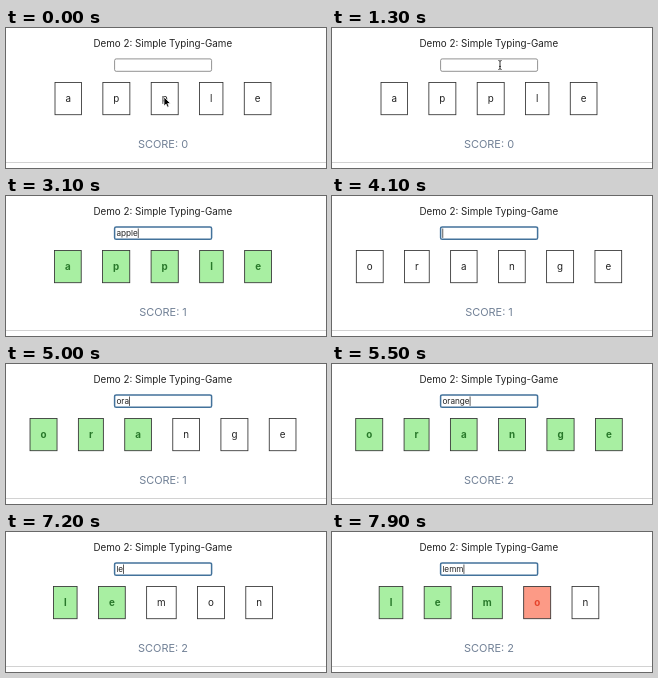
An HTML page for the animation above (8000 ms loop, 320 px wide and 140 px high).

```html
<!DOCTYPE html>
<html lang="en">
<head>
<meta charset="utf-8">
<title>Typing game</title>
<style>
  html, body { margin: 0; width: 100%; height: 100%; overflow: hidden; background: #fff; }
  svg { display: block; width: 320px; height: 140px; font-family: Inter, sans-serif; }
  .mid { text-anchor: middle; }
  .title { font-size: 9.8px; fill: #222; }
  .score { font-size: 10.95px; fill: #718096; }
  .typed { font-size: 8.2px; fill: #222; }
  .card rect { fill: #fff; stroke: #333; stroke-width: .85; }
  .card text { font-size: 9.8px; fill: #222; }
  .card.good rect { fill: #a8efa2; }
  .card.good text { fill: #28782a; font-weight: 700; }
  .card.bad rect { fill: #fc9a86; }
  .card.bad text { fill: #e5432b; font-weight: 700; }
  #field { fill: #fff; stroke: #767676; stroke-width: .8; }
  #field.focus { stroke: #43729b; stroke-width: 1.5; }
</style>
</head>
<body>
<svg viewBox="0 0 320 140">
  <rect width="320" height="140" fill="#fff"/>
  <rect y="134" width="320" height="1" fill="#d2d2d2"/>
  <text class="title mid" x="156.8" y="18.6">Demo 2: Simple Typing-Game</text>
  <rect id="field" x="108.6" y="30.9" width="97" height="12.4" rx="1.6"/>
  <text id="typed" class="typed" x="110.4" y="40"></text>
  <rect id="caret" y="32.5" width=".8" height="9.4" fill="#333"/>
  <g id="cards"></g>
  <text id="score" class="score mid" x="157" y="119.6"></text>
  <path id="arrow" d="M0 0V9L2.1 7.1L3.5 10.2L5 9.5L3.7 6.5H6.5Z" fill="#000" stroke="#fff" stroke-width=".7"/>
  <path id="beam" d="M-1.6 -4.5Q0 -4.5 0 -3.4Q0 -4.5 1.6 -4.5M0 -3.4V3.4M-1.6 4.5Q0 4.5 0 3.4Q0 4.5 1.6 4.5M-1 1.4H1" fill="none" stroke="#222" stroke-width=".9"/>
</svg>
<script>
const LOOP = 8000, FOCUS = 1600, BLINK = 500;
const PAD = 22, GAP = 20.35, CENTER = 157;

const rounds = [
  { start: 0, word: 'apple', keys: [[2400, 'a'], [2700, 'p'], [2800, 'p'], [2900, 'l'], [3000, 'e']] },
  { start: 4000, word: 'orange', keys: [[4800, 'o'], [4900, 'r'], [5000, 'a'], [5100, 'n'], [5200, 'g'], [5300, 'e']] },
  { start: 6300, word: 'lemon', keys: [[7100, 'l'], [7200, 'e'], [7400, 'm'], [7900, 'm']] }
];

// Pointer stops: time, x, y
const pointer = [
  [0, 158, 69], [300, 160, 64], [800, 166, 41], [1000, 167, 38],
  [1300, 168, 37], [1600, 167, 37], [2000, 281, 38], [2400, 281, 38]
];

const $ = id => document.getElementById(id);
const field = $('field'), typedText = $('typed'), caret = $('caret');
const cards = $('cards'), score = $('score'), arrow = $('arrow'), beam = $('beam');
const pen = document.createElement('canvas').getContext('2d');

function textWidth(text, size, weight = 400) {
  pen.font = `${weight} ${size * 10}px Inter, sans-serif`;
  return pen.measureText(text).width / 10;
}

function make(tag, parent, attrs) {
  const el = document.createElementNS('http://www.w3.org/2000/svg', tag);
  for (const key in attrs) el.setAttribute(key, attrs[key]);
  return parent.appendChild(el);
}

function drawCards(word, typed) {
  const list = [...word].map((letter, i) => {
    const state = i >= typed.length ? '' : typed[i] === letter ? 'good' : 'bad';
    return { letter, state, width: PAD + textWidth(letter, 9.8, state ? 700 : 400) };
  });
  const total = list.reduce((sum, c) => sum + c.width, GAP * (list.length - 1));
  let x = CENTER - total / 2;
  cards.replaceChildren();
  for (const { letter, state, width } of list) {
    const g = make('g', cards, { class: 'card ' + state });
    make('rect', g, { x: x + .5, y: 54.5, width: width - 1, height: 32.2 });
    make('text', g, { class: 'mid', x: x + width / 2, y: 74.4 }).textContent = letter;
    x += width + GAP;
  }
}

function pointerAt(t) {
  const i = Math.max(1, pointer.findIndex(p => p[0] >= t));
  const [t0, x0, y0] = pointer[i - 1], [t1, x1, y1] = pointer[i];
  const k = (t - t0) / (t1 - t0), s = k * k * (3 - 2 * k);
  return [x0 + (x1 - x0) * s, y0 + (y1 - y0) * s];
}

function drawPointer(t) {
  const shown = t < 2400;
  const [x, y] = shown ? pointerAt(t) : [0, 0];
  const inField = x > 108 && x < 206 && y > 30 && y < 44;
  for (const [el, on] of [[arrow, shown && !inField], [beam, shown && inField]]) {
    el.setAttribute('visibility', on ? 'visible' : 'hidden');
    el.setAttribute('transform', `translate(${x} ${y})`);
  }
}

let shownState = '';

function render(t) {
  const round = rounds.filter(r => r.start <= t).pop();
  const pressed = round.keys.filter(k => k[0] <= t);
  const typed = pressed.map(k => k[1]).join('');
  const done = rounds.indexOf(round) + (typed === round.word ? 1 : 0);

  const state = round.word + ' ' + typed;
  if (state !== shownState) {
    shownState = state;
    drawCards(round.word, typed);
    typedText.textContent = typed;
    score.textContent = 'SCORE: ' + done;
    caret.setAttribute('x', 110.4 + textWidth(typed, 8.2));
  }

  const lastInput = pressed.length ? pressed[pressed.length - 1][0] : Math.max(round.start, FOCUS);
  const lit = t >= FOCUS && Math.floor((t - lastInput) / BLINK) % 2 === 0;
  caret.setAttribute('visibility', lit ? 'visible' : 'hidden');
  field.setAttribute('class', t >= FOCUS ? 'focus' : '');
  drawPointer(Math.floor(t / 100) * 100);
}

const began = performance.now();
function tick() {
  render((performance.now() - began) % LOOP);
  requestAnimationFrame(tick);
}
tick();
</script>
</body>
</html>
```
